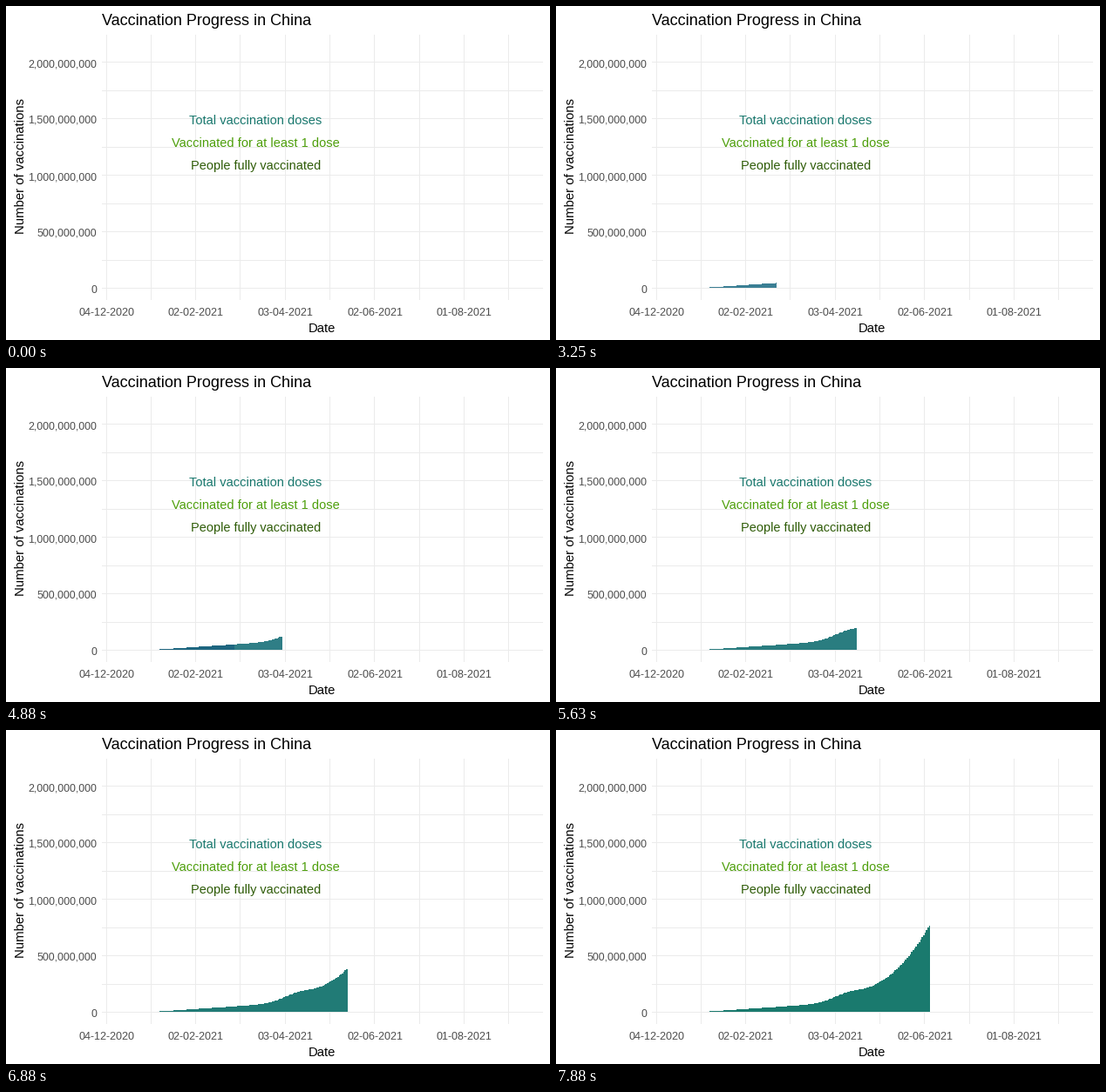
These frames come from a looping animation (624 by 384 pixels, 8 s). A matplotlib script:

```python
import numpy as np
import matplotlib.pyplot as plt
from matplotlib.animation import FuncAnimation
from matplotlib.patches import Rectangle

W, H, DPI = 624, 384, 96
FRAMES, STEP, FIRST = 64, 125, 9
PT = 72 / DPI
GRID, TICK = "#ebebeb", "#4d4d4d"
BASE, LEFT, RIGHT = 324, 176, 429
COL, ROW = 51.29, 32.5          # grid spacing
DAY = 2 * COL / 60

plt.rcParams["font.family"] = "Liberation Sans"
fig = plt.figure(figsize=(W / DPI, H / DPI), dpi=DPI, facecolor="white")
ax = fig.add_axes([0, 0, 1, 1])
ax.axis("off")


def box(x, y, w, h):
    ax.add_patch(Rectangle((x, y), w, h, fc=GRID, lw=0, antialiased=False, zorder=1))


def label(x, y, text, px, color="black", ha="center", **kw):
    ax.text(x, y, text, fontsize=px * PT, color=color, ha=ha, va="baseline", **kw)


# Grid, with major and minor lines alike
for k in range(9):
    box(110, int(BASE + 0.9 - ROW * k), 506, 1)
for k in range(10):
    box(int(115 + COL * k), 33, 1, 305)

# Titles and axis labels
label(110, 22, "Vaccination Progress in China", 17.95, ha="left")
label(362.8, 375, "Date", 14.8)
label(21, 184.5, "Number of vaccinations", 14.85, rotation=90, rotation_mode="anchor")
for k in range(5):
    label(104, 330 - 2 * ROW * k, f"{k * 500_000_000:,}", 12.4, TICK, ha="right")
dates = ("04-12-2020", "02-02-2021", "03-04-2021", "02-06-2021", "01-08-2021")
for k, date in enumerate(dates):
    label(115.3 + 2 * COL * k, 356, date, 12.5, TICK)

# Legend text
label(286.2, 136, "Total vaccination doses", 14.65, "#19786e")
label(286.6, 162, "Vaccinated for at least 1 dose", 14.65, "#4e9f0c")
label(286.6, 188, "People fully vaccinated", 14.5, "#2f5c08")


def height(u):
    """Bar height: steady start, a spring wave, then accelerating growth."""
    wave = 14.5 / (1 + np.exp((144 - u) / 10))
    surge = 0.01 * np.maximum(u - 170, 0) ** 2
    return 0.5 + 0.066 * u + wave + surge


edges = np.arange(LEFT, RIGHT + 1)
cols = edges[:-1]
day = (cols - LEFT) // DAY
tops = BASE - np.round(height((day + 0.6) * DAY))

START, END = np.array([74, 130, 165]) / 255, np.array([26, 122, 110]) / 255
DARK = np.array([30, 102, 128]) / 255


def bars(color):
    return ax.stairs(np.full(cols.size, BASE), edges, baseline=BASE, fill=True,
                     color=color, lw=0, antialiased=False, zorder=2)


old, new = bars(DARK), bars(START)
ax.set_xlim(0, W)
ax.set_ylim(H, 0)


def draw(i):
    # The front moves steadily, a little faster in the middle stretch
    front = round(np.interp(i, [FIRST, 30, 37, FRAMES - 1], [LEFT, 271, 308, RIGHT]))
    split = 262 if 28 <= i < 45 else LEFT
    t = max(i - FIRST, 0) / (FRAMES - 1 - FIRST)
    shown = cols < front
    old.set_data(values=np.where(shown & (cols < split), tops, BASE))
    new.set_data(values=np.where(shown & (cols >= split), tops, BASE))
    new.set_facecolor(START + (END - START) * t)
    return old, new


anim = FuncAnimation(fig, draw, frames=FRAMES, interval=STEP, repeat=True,
                     repeat_delay=0, blit=False)
plt.show()
```
